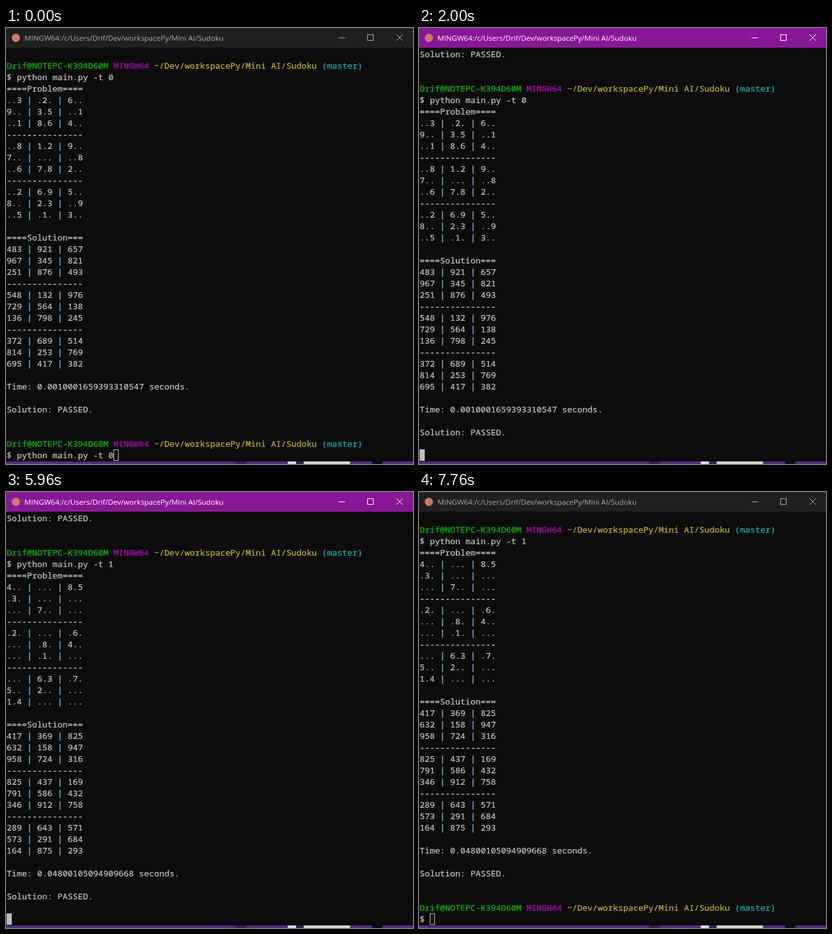
Write an HTML page that moves like this. It is 640 px wide and 685 px high and loops after 7.83 s.

```html
<!DOCTYPE html>
<html lang="en">
<head>
<meta charset="utf-8">
<title>Sudoku solver in a terminal</title>
<style>
  html, body { margin: 0; width: 100%; height: 100%; overflow: hidden; background: #0c0c0c; }
  #win { position: absolute; left: 0; top: 0; width: 640px; height: 685px; overflow: hidden; background: #0c0c0c; }
  #bar {
    position: absolute; left: 0; top: 0; width: 640px; height: 31px; box-sizing: border-box;
    background: #202020; color: #aaa; border-top: 1px solid #35353b;
  }
  .active #bar { background: #881798; color: #fff; border-color: #791488; }
  #icon { position: absolute; left: 9px; top: 8px; width: 13px; height: 13px; border-radius: 50%; background: #cf7a66; }
  #name { position: absolute; left: 29px; top: 6px; font: 11.6px/18px "Open Sans", "Noto Sans", sans-serif; white-space: pre; }
  #bar svg { position: absolute; left: 0; top: -1px; fill: none; stroke: currentColor; }
  #text {
    position: absolute; left: 1px; top: 32px; margin: 0; color: #c8c8c8;
    font: 13.3333px/18px "Noto Sans Mono", "DejaVu Sans Mono", monospace;
    -webkit-text-stroke: 0.2px;
  }
  .user { color: #00bf00; } .sys { color: #bf00bf; } .path { color: #bfbf00; }
  .branch { color: #00bfbf; } .rule { color: #a9cbe4; }
  #caret { position: absolute; top: 662px; width: 8px; height: 18px; box-sizing: border-box; }
  .on { background: #bfbfbf; }
  .hollow { border: 1px solid #bfbfbf; }
  #strip {
    position: absolute; left: 0; top: 681px; width: 640px; height: 4px;
    background: linear-gradient(90deg, #4b3088 0 360px, #2c1f4c 364px 376px, #4b3088 380px 443px,
      #ded9e2 443px 456px, #33215a 456px 468px, #d6d5d8 468px 541px, #4b3088 541px 574px,
      #0d0a14 578px 590px, #4b3088 594px);
  }
  #mouse { position: absolute; left: 0; top: 0; overflow: visible; }
</style>
</head>
<body>
<div id="win">
  <div id="bar">
    <div id="icon"></div>
    <div id="name">MINGW64:/c/Users/Drif/Dev/workspacePy/Mini AI/Sudoku</div>
    <svg width="640" height="30">
      <path d="M523 15.5h10M568.5 10.5h9v9h-9z" shape-rendering="crispEdges"/>
      <path d="M614 10l10 10M624 10l-10 10"/>
    </svg>
  </div>
  <pre id="text"></pre>
  <div id="caret"></div>
  <div id="strip"></div>
  <svg id="mouse" width="12" height="20">
    <path d="M.5 .5V16.5L4.2 13L6.7 18.8L9 17.8L6.5 12.2H11.3Z" fill="#0c0c0c" stroke="#a8a8a8"/>
  </svg>
</div>
<script>
const LOOP = 7830, ROWS = 36;
const $ = id => document.getElementById(id);

const PUZZLES = [
  {
    problem: "..3.2.6.. 9..3.5..1 ..18.64.. ..81.29.. 7.......8 ..67.82.. ..26.95.. 8..2.3..9 ..5.1.3..",
    solution: "483921657 967345821 251876493 548132976 729564138 136798245 372689514 814253769 695417382",
    time: "0.0010001659393310547"
  },
  {
    problem: "4.....8.5 .3....... ...7..... .2.....6. ....8.4.. ....1.... ...6.3.7. 5..2..... 1.4......",
    solution: "417369825 632158947 958724316 825437169 791586432 346912758 289643571 573291684 164875293",
    time: "0.04800105094909668"
  }
];

const span = (cls, text) => `<span class="${cls}">${text}</span>`;
const PROMPT = [
  span("user", "Drif@NOTEPC-K394D60M"), span("sys", "MINGW64"),
  span("path", "~/Dev/workspacePy/Mini AI/Sudoku"), span("branch", "(master)")
].join(" ");

function grid(cells) {
  const rows = cells.split(" ").map(r => r.match(/.{3}/g).join(` ${span("rule", "|")} `));
  const line = "-".repeat(15);
  return [...rows.slice(0, 3), line, ...rows.slice(3, 6), line, ...rows.slice(6)];
}

const command = n => "python main.py -t " + n;
const prompt = typed => ["", PROMPT, "$ " + typed];
const entered = n => [...prompt(command(n)), ""];

function run(n) {
  const p = PUZZLES[n];
  return [
    ...prompt(command(n)),
    "====Problem====", ...grid(p.problem), "",
    "====Solution===", ...grid(p.solution), "",
    `Time: ${p.time} seconds.`, "",
    "Solution: PASSED.", ""
  ];
}

// [start ms, finished runs, lines after them, caret style]
const STEPS = [
  [0, [0], prompt(command(0)), "hollow"],
  [620, [0], prompt(command(0)), "on"],
  [1010, [0], prompt(command(0)), "off"],
  [1390, [0], prompt(command(0)), "on"],
  [1470, [0], entered(0), "on"],
  [1930, [0, 0], [""], "on"],
  [2080, [0, 0], prompt(""), "on"],
  [2470, [0, 0], prompt(""), "off"],
  [2830, [0, 0], prompt(""), "on"],
  [3230, [0, 0], prompt(""), "off"],
  [3470, [0, 0], prompt(command(0)), "on"],
  [4230, [0, 0], prompt(command(0)), "off"],
  [4630, [0, 0], prompt(command(0)), "on"],
  [5030, [0, 0], prompt(command(1)), "on"],
  [5480, [0, 0], entered(1), "on"],
  [5960, [0, 1], [""], "on"],
  [6130, [0, 1], prompt(""), "on"],
  [6530, [0, 1], prompt(""), "off"],
  [6930, [0, 1], prompt(""), "on"],
  [7330, [0, 1], prompt(""), "off"],
  [7600, [0, 1], prompt(""), "hollow"]
];

// Pointer trips as [ms, x, y]; it hides while keys are in use.
const TRIPS = [
  [[70, 520, 690], [300, 505, 610], [560, 478, 520], [850, 470, 502], [1390, 474, 507], [1470, 474, 507]],
  [[6510, 474, 508], [6750, 480, 540], [7050, 500, 625], [7300, 518, 690]]
];

function pointer(t) {
  const trip = TRIPS.find(p => t >= p[0][0] && t < p[p.length - 1][0]);
  if (!trip) return null;
  const i = trip.findIndex(p => p[0] > t), [t0, x0, y0] = trip[i - 1], [t1, x1, y1] = trip[i];
  const k = (t - t0) / (t1 - t0);
  return [x0 + (x1 - x0) * k, y0 + (y1 - y0) * k].map(Math.round);
}

let shown = null;
function show(step) {
  if (step === shown) return;
  shown = step;
  const [, runs, tail, caret] = step;
  const lines = [...runs.flatMap(run), ...tail].slice(-ROWS);
  $("text").innerHTML = lines.join("\n") + "\n";
  $("caret").className = caret;
  $("caret").style.left = 1 + 8 * lines[ROWS - 1].length + "px";
  $("win").className = caret === "hollow" ? "" : "active";
}

function draw(t) {
  show(STEPS.filter(s => s[0] <= t).pop());
  const at = pointer(t), mouse = $("mouse");
  mouse.style.display = at ? "block" : "none";
  if (at) mouse.style.transform = `translate(${at[0]}px, ${at[1]}px)`;
}

const start = performance.now();
function tick() {
  draw((performance.now() - start) % LOOP);
  requestAnimationFrame(tick);
}
tick();
</script>
</body>
</html>
```
